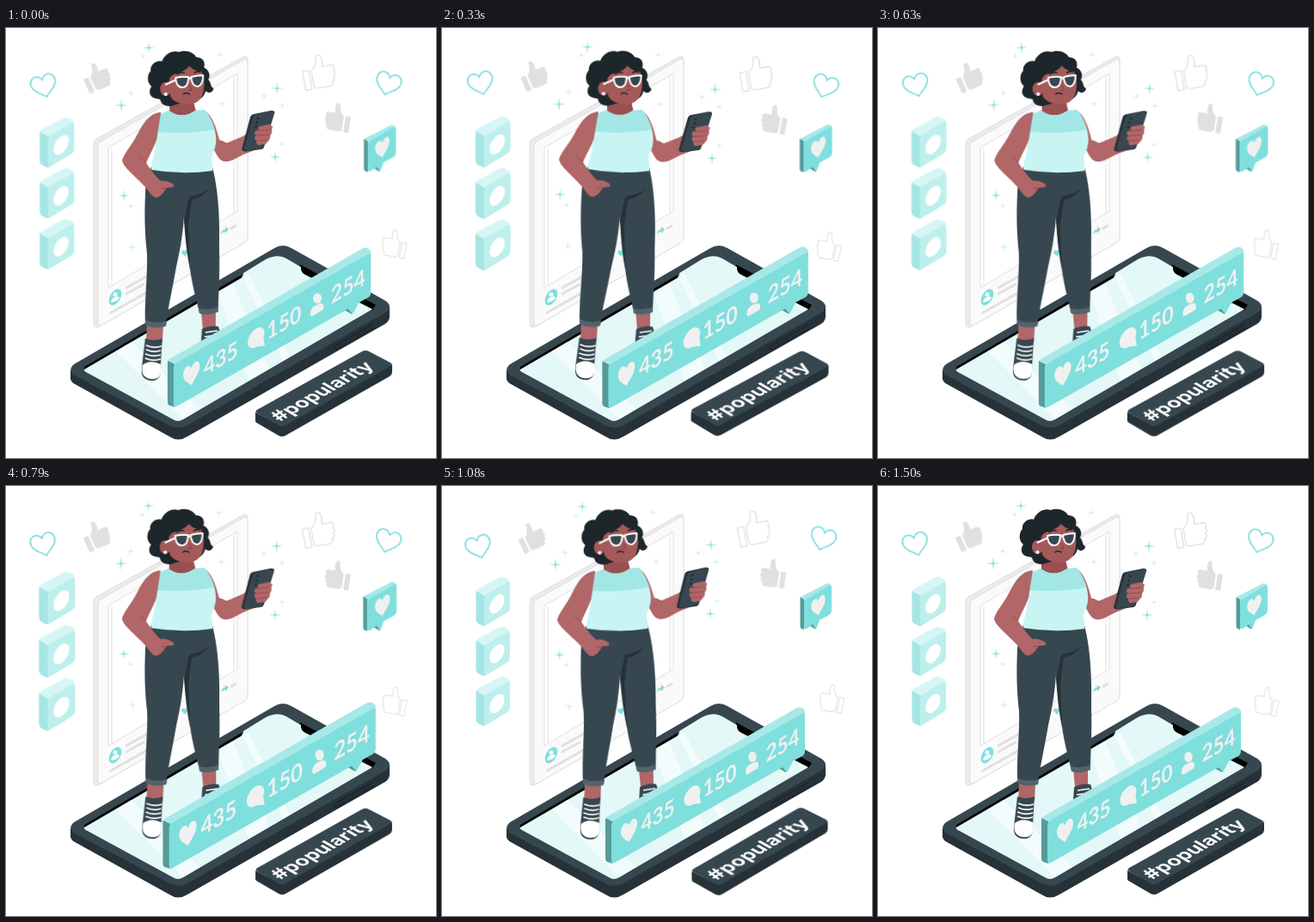
These frames come from a looping animation (500 px wide and 500 px high, 1540 ms). An HTML page:

```html
<!DOCTYPE html>
<html lang="en">
<head>
<meta charset="utf-8">
<title>#popularity</title>
<style>
  html, body { margin: 0; width: 100%; height: 100%; overflow: hidden; background: #fff; }
  svg { display: block; width: 100vw; height: 100vh; }
  .sway, .beat { transform-box: view-box; }
  .count { font: 700 26px Lato, sans-serif; text-anchor: middle; fill: #f0f0f0; }
  .tag { font: 700 22.5px Inter, sans-serif; text-anchor: middle; fill: #fff; }
  .skin { fill: #b16668; }
  .dark { fill: #263238; }
  .slate { fill: #37474f; }
  .pale { fill: #f0f0f0; }
  .teal { fill: #7fdfdd; }
  .solid { fill: #e0e0e0; }
  .line { fill: #fff; stroke: #e0e0e0; stroke-width: 1.4; }
</style>
</head>
<body>
<svg viewBox="0 0 500 500">
  <defs>
    <path id="heart" d="M0 13C-5 8-15 3-15-5C-15-11-10-14-6-13C-3-12.5-1-10 0-8C1-10 3-12.5 6-13C10-14 15-11 15-5C15 3 5 8 0 13Z"/>
    <path id="thumb" d="M-20-3h8v24h-8zM-9-2C-4-5-1-11-1-17C-1-21 5-21 6-16C7-12 6-9 5-5H16C20-5 21 0 18 2C21 4 20 8 17 9C19 11 18 15 15 15C16 18 14 21 11 21H-3Q-7 21-9 18Z"/>
    <g id="cube">
      <path fill="#d6f6f5" d="M41 117L67 103Q70 102 73 103.500L77 105.500Q79 107 78 109L50 126L40 120Q39 118 41 117Z"/>
      <path fill="#a5e6e4" d="M39.500 119L50 125V160Q48 160 46 159L42 157Q39.500 155 39.500 152Z"/>
      <path fill="#bdefed" d="M49 128Q49 125 52 123L75 109.500Q79 107 79 111V139Q79 142 76 144L53 158Q49 161 49 157Z"/>
      <ellipse rx="10" ry="10" transform="matrix(.866 -.5 0 1 64 134)" fill="#fff"/>
    </g>
  </defs>

  <!-- photo post -->
  <g stroke="#e0e0e0">
    <path fill="#ebebeb" d="M102 135Q102 131 105 129L275 34Q281 31 281 37V243Q281 248 277 250L109 347Q102 350 102 344Z"/>
    <path fill="#fafafa" d="M107 137Q107 134 110 132L276 37Q281 34 281 40V243Q281 248 277 250L112 345Q107 348 107 343Z"/>
    <path fill="#fff" d="M119 139L269 53V213L119 302Z"/>
    <path fill="none" d="M123 140V300M265 56V215"/>
  </g>
  <g fill="none" stroke="#e0e0e0" stroke-width="3" stroke-linecap="round">
    <path d="M140 302L172 284M140 309L160 298M122 331L168 305M262 233L267 230"/>
  </g>
  <ellipse rx="8.500" ry="8.500" transform="matrix(.866 -.5 0 1 127 313)" class="teal"/>
  <circle cx="127" cy="310" r="2.500" fill="#fff"/>
  <path d="M122 319Q123 313 127 313Q131 311 132 314Q128 319 122 319Z" fill="#fff"/>
  <use href="#heart" transform="translate(208 262) rotate(-8) scale(.24 .28)" class="teal"/>
  <path d="M250 240Q251 234 255 234V231L259 234L255 239V237Q252 237 250 240Z" class="teal"/>

  <!-- big phone -->
  <path class="dark" d="M75 398V408Q76 412 80 414L190 475Q200 482 211 475L441 344Q447 340 446 333V324Z"/>
  <path class="slate" d="M79 391L312 256Q322 250 332 256L441 317Q451 324 441 331L211 462Q200 468 190 462L80 404Q71 398 79 391Z"/>
  <path fill="#000" d="M91 394L274 287V291L91 400ZM342 275L430 322L426 328L340 283Z"/>
  <path fill="#e3f8f7" d="M91 397L273 291Q276 289 276 285L302 269Q316 262 326 268L343 278Q342 285 350 288L358 292L426 327L206 455Q200 459 194 455L91 399Z"/>
  <path fill="#f3fcfc" d="M246 307L264 297L306 396L282 410ZM128 376L146 365L226 443L206 455ZM275 290L282 286L330 382L322 387Z"/>
  <path fill="none" stroke="#1c262b" stroke-width="1.500" d="M426 345L385 368Q381 371 382 373Q383 374 387 372L428 349"/>

  <!-- hashtag plate -->
  <g class="sway" style="transform-origin:369px 425px">
    <path class="dark" d="M290 447V457Q290 459 293 460L317 474Q321 476 325 474L446 405Q449 403 449 400V391L321 463Z"/>
    <path class="slate" d="M292 444L414 376Q418 374 422 376L447 389Q450 391 447 393L325 462Q321 464 317 462L292 448Q289 446 292 444Z"/>
    <text class="tag" transform="matrix(.866 -.5 .866 .5 374 426)">#popularity</text>
  </g>

  <!-- floating reactions -->
  <g class="sway" style="transform-origin:248px 148px">
    <g fill="none" stroke="#7fdfdd" stroke-width="1.800">
      <use href="#heart" transform="translate(44 68) rotate(-15) scale(.97)"/>
      <use href="#heart" transform="translate(444 65) rotate(17) scale(.97)"/>
    </g>
    <use href="#thumb" class="solid" transform="translate(105 56) rotate(-24) scale(.77)"/>
    <use href="#thumb" class="line" transform="translate(363.500 50) rotate(-10) scale(.93)"/>
    <use href="#thumb" class="solid" transform="translate(386 103) rotate(9) scale(-.74 .8)"/>
    <use href="#thumb" class="line" transform="translate(452 249.500) rotate(11) scale(-.7 .76)"/>
  </g>

  <g class="beat" style="transform-origin:59px 192px">
    <use href="#cube" y="3"/>
    <use href="#cube" y="61"/>
    <use href="#cube" y="119"/>
  </g>

  <g class="beat" style="transform-origin:434.500px 140px">
    <path fill="#a6e9e8" d="M417 129L447 113.500Q449 113 451 114L453 116L421 134Z"/>
    <path fill="#549b99" d="M416.500 129L421 132V167L418 166Q416.500 165 416.500 163ZM427 162L434 166.500L436 162L430 158Z"/>
    <path class="teal" d="M421 135Q421 133 423 132L450 116Q453 114 453 118V145Q453 148 450 150L439 156L435 166.500L431 161L424 166Q421 167 421 164Z"/>
    <use href="#heart" class="pale" transform="matrix(.55 -.3 0 .8 437.500 140)"/>
  </g>

  <!-- woman -->
  <g class="sway" style="transform-origin:224px 218px">
    <g id="sparks" fill="#7fdfdd"></g>

    <path class="skin" d="M164 345L183 346L182 366H163ZM227 329L244 328V350H229Z"/>
    <path class="slate" d="M228 350Q238 345 247 347Q250 354 249 362L248 380H226Z"/>
    <path d="M232 354L246 352M231 359L247 357" stroke="#fff" stroke-width="1.300"/>
    <path class="slate" d="M162 361Q172 365 182 361C181 375 180 388 180 399C180 407 175 411 168 410C160 409 157 404 158 396C159 385 161 372 162 361Z"/>
    <path fill="#fff" d="M159 392Q168 385 180 391V400C180 406 175 409 168 408C160 407 157 401 159 392Z"/>
    <path fill="none" stroke="#fff" stroke-width="1.700" d="M163 369Q172 373 181 370M163 374Q172 378 180 375M162 379Q171 383 180 380M162 384Q171 388 180 385"/>

    <path class="skin" d="M231 96C239 101 244 114 248 130L256 134L275 126L288 118L310 114L306 130C299 139 286 143 276 147C266 152 257 159 249 153C243 147 238 132 233 121Z"/>
    <path class="slate" d="M169 161Q205 169 240 162C246 185 249 215 248 258C249 290 247 310 247 329Q236 335 225 331C221 314 216 296 214 280C211 260 209 240 207 220C205 245 202 260 198 278C194 302 188 328 186 346Q172 350 162 344C161 315 165 285 164 262C161 235 161 215 162 190C163 177 166 169 169 161Z"/>
    <path class="dark" d="M237 186Q230 193 213 196L207 224Q209 256 214 281L212 230L216 200Q230 196 237 186Z"/>
    <path fill="#52636b" d="M162 339Q172 345 187 341L186 347Q172 351 162 345ZM224 326Q236 329 247 324V330Q236 335 225 332Z"/>

    <path fill="#9a4f50" d="M190 74V98Q203 111 221 98L217 82Z"/>
    <path fill="#c8f5f3" d="M178 101L189 96Q204 107 220 96L231 95C238 104 243 115 244 126C245 136 242 143 239 149C239 155 241 160 240 166Q205 171 169 165C168 157 172 150 173 142C176 125 176 112 178 101Z"/>
    <path fill="#a2e7e5" d="M178 101L189 96Q204 107 220 96L231 95Q238 104 242 118Q210 124 176 121Z"/>
    <path class="skin" d="M180 98C166 99 159 112 153 123C146 137 137 146 135 154C136 162 150 172 163 186C168 193 171 198 176 197C182 195 184 189 187 186L195 185Q196 181 189 179Q185 177 180 178C175 174 168 165 163 157C166 149 172 139 175 130Z"/>
    <path fill="none" stroke="#8e4648" stroke-width=".8" d="M163 157L155 150M187 186L180 187M250 131L258 135"/>

    <path fill="#1c262b" d="M174 82C165 80 166 72 169 68C163 63 164 54 168 50C167 42 176 37 181 39C184 30 194 25 201 28C208 25 218 28 221 34C229 34 232 40 230 46C236 49 238 55 235 60C239 64 237 68 241 70C241 75 235 77 232 73C230 82 222 86 215 84L191 91C182 91 180 87 179 83Z"/>
    <path fill="#a45a59" d="M190 67C188 58 192 54 199 53Q208 50 213 44Q219 51 227 50C230 56 231 63 230 70C229 80 224 88 213 89C203 89 195 86 191 80Z"/>
    <ellipse cx="185.500" cy="71" rx="6.500" ry="8" fill="#a45a59"/>
    <circle cx="185.500" cy="77" r="2" fill="#fff"/>
    <path fill="none" stroke="#1c262b" stroke-width="1.600" stroke-linecap="round" d="M199 54Q202 51 207 52M219 52Q222 50 226 51M206 77Q209 74 213 77"/>
    <path fill="none" stroke="#fff" stroke-width="2" d="M185 66L198 60"/>
    <path fill="#37474f" stroke="#fff" stroke-width="2" stroke-linejoin="round" d="M197 58Q204 56 212 57Q212 68 206 69Q198 70 197 58ZM215 57Q222 55 229 55Q229 66 223 68Q216 68 215 57ZM212 59L215 58"/>
    <path fill="none" stroke="#7e3d3f" d="M213 66L216 72L212 73"/>

    <path class="dark" d="M284 103Q285 100.500 288 100L308 96Q313 95.500 312 99L300 138Q299 141 296 141L278 143.500Q273 143 274.500 139Z"/>
    <path class="slate" d="M287 104Q288 101 291 100.500L309 97Q312 97 311 100L299 137Q298 140 295 140L280 142.500Q276 142 277 139Z"/>
    <path fill="none" stroke="#1c262b" stroke-width="2.500" stroke-linecap="round" stroke-dasharray="0 5" d="M293 105L290 117"/>
    <path fill="none" stroke="#b16668" stroke-width="6" stroke-linecap="round" d="M306 115L296 117M306 121L292 122M304 127L292 128M300 132L294 133"/>
    <path fill="none" stroke="#8e4648" stroke-width=".8" d="M307 118L293 119.500M306 124L291 125M303 130L292 131"/>
  </g>

  <!-- counters -->
  <g class="beat" style="transform-origin:306px 348px">
    <path fill="#a6e9e8" d="M191 385L411 259Q415 256 419 258L422 261V268L197 396Z"/>
    <path fill="#549b99" d="M190 386L198 390V439L192 437Q190 436 190 433ZM391 328L400 333L404 322Z"/>
    <path class="teal" d="M197 394Q197 391 200 389L418 265Q422 262 422 267V308Q422 312 419 314L408 320L401 333L396 327L201 438Q197 440 197 436Z"/>
    <use href="#heart" class="pale" transform="matrix(.63 -.35 0 .92 217.500 402)"/>
    <text class="count" transform="matrix(.866 -.5 0 1 251 392.500)">435</text>
    <ellipse rx="11" ry="10.500" transform="matrix(.866 -.5 0 1 291 360)" class="pale"/>
    <path class="pale" d="M291 370L301 369L299 358Z"/>
    <text class="count" transform="matrix(.866 -.5 0 1 323 351.500)">150</text>
    <ellipse cx="361" cy="315" rx="4.800" ry="6" class="pale"/>
    <path class="pale" d="M353 334V331Q354 325 360 322.500Q367 319 368 323V326Q368 328 366 329L356 335Q353 336 353 334Z"/>
    <text class="count" transform="matrix(.866 -.5 0 1 396 310.500)">254</text>
  </g>
</svg>
<script>
  // x, y, radius
  const sparks = [
    [166, 23, 7], [134, 90, 8], [137, 195, 7], [315, 70, 7.5], [313, 150, 7],
    [159, 33, 4], [145, 76, 5], [248, 31, 4.5], [300, 79, 5], [321, 90, 4.5],
    [321, 135, 4], [147, 255, 6], [145, 207, 4], [251, 88, 5]
  ];
  const star = ([x, y, r]) => {
    const k = r * 0.1;
    return `<path opacity="${r > 6 ? 1 : 0.6}" transform="translate(${x} ${y})"
      d="M0 ${-r}L${k} ${-k}L${r} 0L${k} ${k}L0 ${r}L${-k} ${k}L${-r} 0L${-k} ${-k}Z"/>`;
  };
  document.getElementById('sparks').innerHTML = sparks.map(star).join('');

  const timing = { duration: 1540, delay: -30, iterations: Infinity, easing: 'linear' };
  const steps = (fn, table) => table.map(([offset, v]) => ({ offset, transform: `${fn}(${v})` }));
  const moves = {
    '.sway': steps('rotate', [[0, '0deg'], [.25, '1deg'], [.75, '-1deg'], [1, '0deg']]),
    '.beat': steps('scale', [[0, 1], [.1, 1.1], [.3, 1], [.4, 1], [.5, 1.1], [.6, 1], [1, 1]])
  };
  const started = document.timeline.currentTime;
  for (const [name, frames] of Object.entries(moves))
    for (const el of document.querySelectorAll(name))
      el.animate(frames, timing).startTime = started;
</script>
</body>
</html>
```
